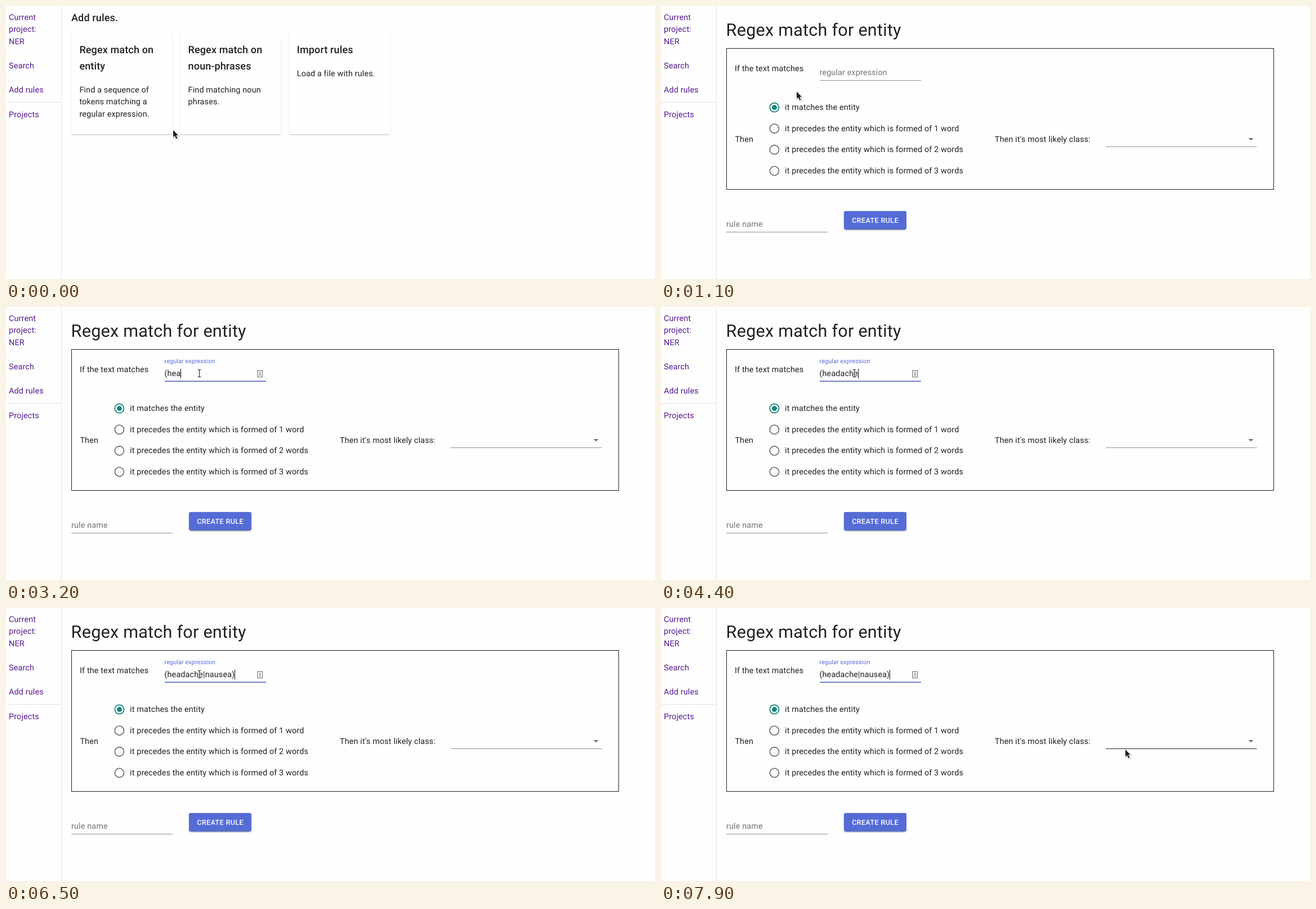
An HTML page with a canvas for the animation above (8 s loop, 1153x486 px).

```html
<!DOCTYPE html>
<html lang="en">
<head>
<meta charset="utf-8">
<title>Add rules</title>
<style>
  html, body { margin: 0; width: 100%; height: 100%; overflow: hidden; background: #fefefe; }
  canvas { display: block; }
</style>
</head>
<body>
<canvas id="stage" width="1153" height="486"></canvas>
<script>
const ctx = document.getElementById('stage').getContext('2d');
const LOOP = 8000;
const BG = '#fefefe', INK = '#212121', GREY = '#757575', LINE = '#919191';
const LINK = '#551a8b', PRIMARY = '#556cd6', TEAL = '#19857b';
const FIELD_X = 281.5;

// Cursor stops: time, x, y, shape
const moves = [
  [0, 297, 221, 'arrow'], [100, 283, 206, 'hand'], [200, 264, 180, 'hand'],
  [300, 249, 160, 'hand'], [400, 243, 152, 'hand'], [600, 241, 152, 'hand'],
  [1100, 241, 152.5, 'arrow'], [1500, 272, 143, 'arrow'], [1600, 320, 125, 'beam'],
  [1700, 343.5, 118, 'beam'], [7100, 351, 139, 'arrow'], [7200, 363, 167, 'arrow'],
  [7300, 369, 180, 'hand'], [7500, 410, 186, 'arrow'], [7600, 525, 206, 'arrow'],
  [7700, 660, 228, 'arrow'], [7800, 775, 245, 'arrow'], [7900, 825, 252, 'arrow']
];

// Typing: time, number of characters in the field
const phrase = '(headache|nausea)';
const keys = [
  [0, 0], [2600, 1], [2900, 2], [3200, 4], [3800, 5], [4000, 6], [4200, 7], [4300, 8],
  [4400, 9], [5100, 10], [5700, 12], [5900, 13], [6000, 14], [6100, 15], [6300, 16], [6500, 17]
];

const arrow = new Path2D('M0 0V12.6L2.9 9.9L5.2 15.2L7.4 14.2L5.1 9.2H8.9Z');
const hand = new Path2D('M-1.6 1.2Q0-1 1.6 1.2V5.8L3.2 5.6L4.4 6.4L6 6.3L7 7.2Q9.3 7 9.3 9' +
  'L8.4 12.8L8 15.5H-.6L-1.2 13.4L-5 9.2Q-5.6 7-3.4 7.2L-1.6 9Z');
const knuckles = new Path2D('M1.6 6V9M4.2 6.6V9M6.7 7.2V9.2');
const beam = new Path2D('M-3-6.5H-1L0-5.8L1-6.5H3M0-5.8V5.8M-3 6.5H-1L0 5.8L1 6.5H3');

const latest = (list, t) => list.filter(item => item[0] <= t).pop();

function setFont(size, weight, spacing) {
  ctx.font = `${weight} ${size}px Roboto, sans-serif`;
  ctx.letterSpacing = spacing * size + 'px';
}

function text(str, x, y, color = INK, size = 14.4, weight = 400, spacing = 0.00938) {
  setFont(size, weight, spacing);
  ctx.fillStyle = color;
  ctx.fillText(str, x, y);
}

const heading = (str, x, y) => text(str, x, y, INK, 18, 500, 0.0075);

function rect(x, y, w, h, color) {
  ctx.fillStyle = color;
  ctx.fillRect(x, y, w, h);
}

function roundBox(x, y, w, h, r, color) {
  ctx.fillStyle = color;
  ctx.beginPath();
  ctx.roundRect(x, y, w, h, r);
  ctx.fill();
}

// Each shadow: offset, blur, spread, alpha
function raised(x, y, w, h, color, shadows) {
  for (const [dy, blur, spread, alpha] of shadows) {
    const s = spread * 0.9;
    ctx.save();
    ctx.shadowColor = `rgba(0,0,0,${alpha})`;
    ctx.shadowOffsetY = dy * 0.9;
    ctx.shadowBlur = blur * 0.9;
    roundBox(x - s, y - s, w + 2 * s, h + 2 * s, 3.6, color);
    ctx.restore();
  }
  roundBox(x, y, w, h, 3.6, color);
}

function sidebar() {
  const links = [['Current', 25], ['project:', 46], ['NER', 68], ['Search', 111],
    ['Add rules', 154], ['Projects', 198]];
  for (const [str, y] of links) text(str, 5, y, LINK);
  rect(98, 0, 1, 486, '#e0e0e0');
  rect(0, 171, 98, 1, '#e0e0e0');
}

function card(x, title, body) {
  raised(x, 49, 180, 179.4, BG, [[1, 3, 0, 0.12], [1, 1, 0, 0.14], [2, 1, -1, 0.2]]);
  title.forEach((str, i) => heading(str, x + 14.4, 84 + i * 29));
  const top = 125 + (title.length - 1) * 29;
  body.forEach((str, i) => text(str, x + 14.4, Math.floor(top + i * 21.6)));
}

function menuPage() {
  heading('Add rules.', 116, 27);
  card(116, ['Regex match on', 'entity'],
    ['Find a sequence of', 'tokens matching a', 'regular expression.']);
  card(309.2, ['Regex match on', 'noun-phrases'], ['Find matching noun', 'phrases.']);
  card(502.4, ['Import rules'], ['Load a file with rules.']);
}

function radio(y, label, checked) {
  ctx.strokeStyle = ctx.fillStyle = checked ? TEAL : GREY;
  ctx.lineWidth = 1.8;
  ctx.beginPath();
  ctx.arc(201.4, y, 8.1, 0, 7);
  ctx.stroke();
  if (checked) {
    ctx.beginPath();
    ctx.arc(201.4, y, 4.5, 0, 7);
    ctx.fill();
  }
  text(label, 220, Math.floor(y + 4.9));
}

function fillIcon() {
  ctx.strokeStyle = '#858585';
  ctx.lineWidth = 1.4;
  ctx.strokeRect(446.9, 113.2, 8.6, 11.4);
  rect(450.2, 115.5, 2, 2.6, '#858585');
  rect(449.2, 118.8, 4, 1, '#858585');
  rect(449.2, 120.8, 4, 1.2, '#858585');
}

function regexField(t) {
  const focused = t >= 2000, settled = t >= 2400;
  const hovered = t >= 1600 && t < 7100;
  rect(282, 132, 180, 1, hovered ? INK : LINE);
  if (!focused) {
    text('regular expression', FIELD_X, 123, GREY);
    return;
  }
  if (!settled) rect(282, 131, 180, 1, 'rgba(33,33,33,.5)');
  const inset = settled ? 0 : 2.5;
  rect(282 + inset, 131, 180 - 2 * inset, 1, 'rgba(75,95,190,.55)');
  rect(282 + inset, 132, 180 - 2 * inset, 1, '#4b5fb8');
  text('regular expression', FIELD_X, settled ? 100 : 101, PRIMARY, settled ? 10.8 : 10.92);

  const typed = phrase.slice(0, latest(keys, t)[1]);
  text(typed, FIELD_X, 123);
  if (t < 7200 || t >= 7500) {
    rect(Math.round(FIELD_X + ctx.measureText(typed).width), 110, 1, 17, '#111');
  }
  if (settled) fillIcon();
}

function classSelect(t) {
  text("Then it's most likely class:", 593, 242);
  rect(790, 250, 268.5, 1, t >= 7800 ? INK : LINE);
  ctx.fillStyle = GREY;
  ctx.fill(new Path2D('M1043.5 235H1052.5L1048 239.6Z'));
}

function rulePage(t) {
  text('Regex match for entity', 115.6, 53, INK, 30.6, 400, 0.00735);
  ctx.strokeStyle = INK;
  ctx.lineWidth = 1;
  ctx.strokeRect(116.5, 75.5, 972, 251);

  text('If the text matches', 131, 116);
  regexField(t);

  text('Then', 131.4, 242);
  radio(180.6, 'it matches the entity', true);
  ['1 word', '2 words', '3 words'].forEach((n, i) =>
    radio(218.2 + i * 37.65, 'it precedes the entity which is formed of ' + n, false));
  classSelect(t);

  text('rule name', 116, 393, GREY);
  rect(116, 402, 180, 1, LINE);
  raised(325, 365, 111, 32.6, PRIMARY, [[1, 5, 0, 0.12], [2, 2, 0, 0.14], [3, 1, -2, 0.2]]);
  text('CREATE RULE', 339.2, 386, '#fff', 12.6, 500, 0.02857);
}

function outline(path, color, width) {
  ctx.strokeStyle = color;
  ctx.lineWidth = width;
  ctx.stroke(path);
}

function cursor(t) {
  const [, x, y, shape] = latest(moves, t);
  ctx.save();
  ctx.translate(x, y);
  ctx.lineJoin = 'round';
  if (shape === 'beam') {
    outline(beam, 'rgba(255,255,255,.8)', 3);
    outline(beam, '#222', 1.1);
  } else {
    const isArrow = shape === 'arrow';
    const path = isArrow ? arrow : hand;
    ctx.save();
    ctx.shadowColor = 'rgba(0,0,0,.3)';
    ctx.shadowBlur = 2;
    ctx.shadowOffsetX = ctx.shadowOffsetY = 1;
    outline(path, '#fff', 2);
    ctx.restore();
    ctx.fillStyle = isArrow ? '#1c1c1c' : '#fff';
    ctx.fill(path);
    if (!isArrow) {
      outline(path, '#222', 1.2);
      outline(knuckles, '#222', 0.9);
    }
  }
  ctx.restore();
}

function draw(now) {
  const t = now % LOOP;
  rect(0, 0, 1153, 486, BG);
  sidebar();
  if (t < 1100) menuPage();
  else rulePage(t);
  cursor(t);
}

ctx.textRendering = 'geometricPrecision';
let start;
function tick(now) {
  start ??= now;
  draw(now - start);
  requestAnimationFrame(tick);
}
requestAnimationFrame(tick);
</script>
</body>
</html>
```
